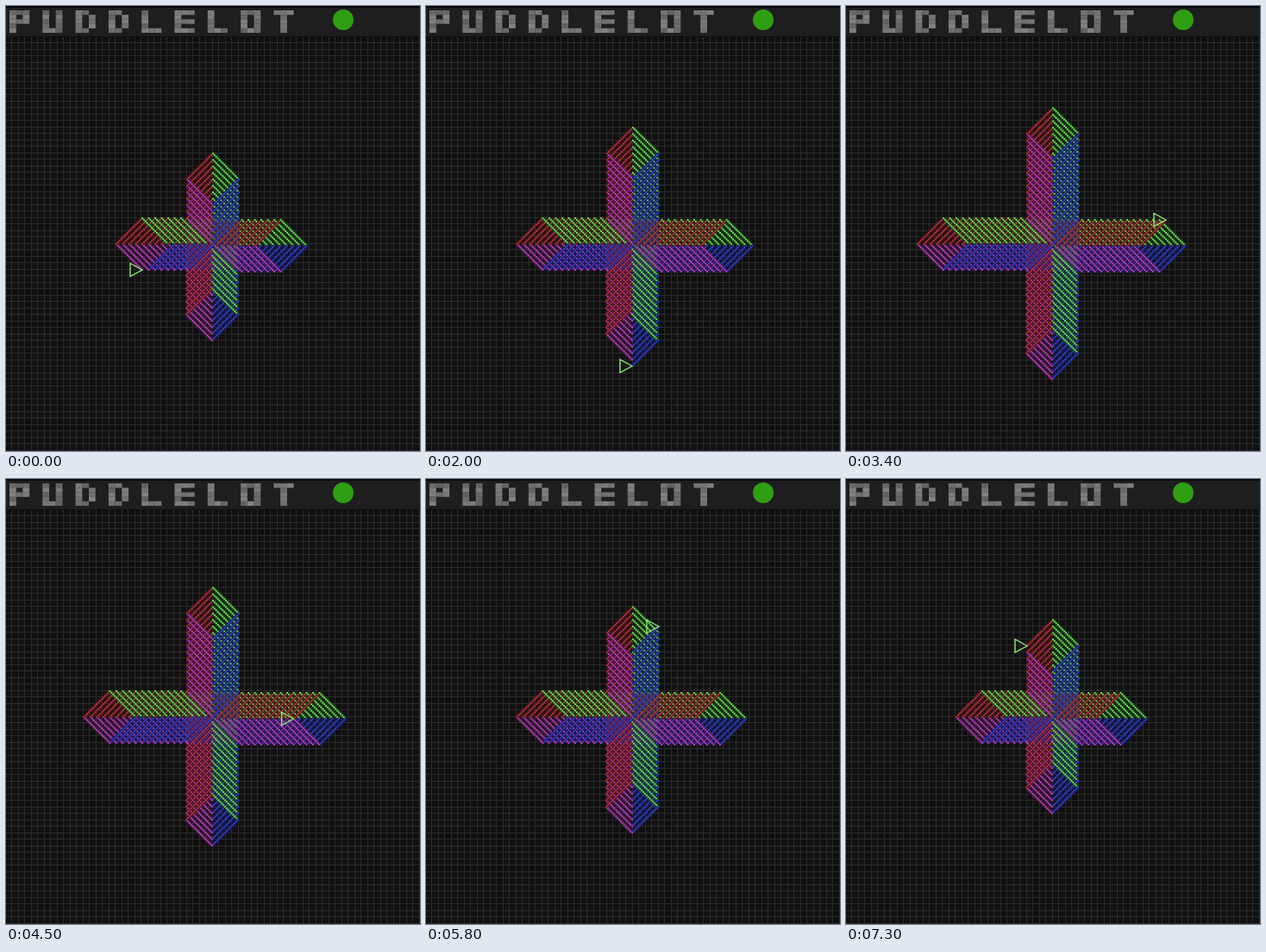
An HTML page with a canvas that plays this animation: 480 by 516 pixels, repeating every 7.4 s.

```html
<!DOCTYPE html>
<html lang="en">
<head>
<meta charset="utf-8">
<title>PUDDLELOT</title>
<style>
html, body { margin: 0; width: 100%; height: 100%; overflow: hidden; background: #101010; }
canvas { display: block; width: 480px; height: 516px; }
</style>
</head>
<body>
<canvas id="stage" width="480" height="516" role="img" aria-label="PUDDLELOT"></canvas>
<script>
const LOOP = 7400, TICK = 100, TURN = 3740;
const CELL = 7.5, DOT = 1.875, RADIUS = 30, TOP = 36;
const ctx = document.getElementById('stage').getContext('2d');

// Diamond corners, clockwise from the right; each side has a bright core and a dim band.
const corners = [[1, 0], [0, 1], [-1, 0], [0, -1]];
const sides = [
  { core: '#3440c8', band: 'rgba(18,30,125,.62)' },
  { core: '#b848b8', band: 'rgba(95,22,100,.62)' },
  { core: '#b83440', band: 'rgba(95,18,24,.62)' },
  { core: '#74e85c', band: 'rgba(20,84,18,.62)' }
];

// Arms in drawing order, growing from the middle; start is the corner facing it.
const arms = [
  { x: 239, y: 275, dx: 0, dy: 1, start: 3 },
  { x: 240.5, y: 276, dx: -1, dy: 0, start: 0 },
  { x: 240, y: 276, dx: 0, dy: -1, start: 1 },
  { x: 243.5, y: 278, dx: 1, dy: 0, start: 2 }
];

// Number of diamonds on the stage over time.
const progress = [
  [0, 45.7], [1000, 53.8], [2000, 60.55], [3400, 71.3], [TURN, 73.8],
  [4500, 67.95], [5800, 58.1], [7300, 46.7], [LOOP, 45.7]
];

const glyphs = { P: '75744', U: '55557', D: '65556', L: '44447', E: '74747', O: '75557', T: '72222' };

function countAt(t) {
  const i = progress.findIndex(([time]) => time > t);
  const [t0, a] = progress[i - 1], [t1, b] = progress[i];
  return a + (b - a) * (t - t0) / (t1 - t0);
}

function diamond(i) {
  const arm = arms[i % 4], shift = Math.floor(i / 4) * CELL;
  return { x: arm.x + arm.dx * shift, y: arm.y + arm.dy * shift, start: arm.start };
}

function corner(d, step) {
  const [cx, cy] = corners[(d.start + step) % 4];
  return [d.x + cx * RADIUS, d.y + cy * RADIUS];
}

function drawSide(d, step) {
  const [x0, y0] = corner(d, step), [x1, y1] = corner(d, step + 1);
  const { core, band } = sides[(d.start + step) % 4];
  ctx.strokeStyle = band;
  ctx.lineWidth = 4;
  ctx.beginPath();
  ctx.moveTo(x0, y0);
  ctx.lineTo(x1, y1);
  ctx.stroke();
  ctx.fillStyle = core;
  for (let k = 0; k < 16; k++) {
    ctx.fillRect(x0 + (x1 - x0) * k / 16 - DOT / 2, y0 + (y1 - y0) * k / 16 - DOT / 2, DOT, DOT);
  }
}

function drawTitle(g, text) {
  let seed = 7;
  [...text].forEach((letter, n) => {
    [...glyphs[letter]].forEach((bits, row) => {
      for (let col = 0; col < 3; col++) {
        seed = (seed * 73 + 41) % 1009;
        const shade = 98 + seed % 34;
        g.fillStyle = `rgb(${shade},${shade},${shade})`;
        if (bits >> (2 - col) & 1) g.fillRect(4 + n * 38.3 + col * 7.7, 5 + row * 5.2, 7.8, 5.3);
      }
    });
  });
}

function makeBackdrop() {
  const layer = document.createElement('canvas');
  layer.width = 480;
  layer.height = 516;
  const g = layer.getContext('2d');
  g.fillStyle = '#101010';
  g.fillRect(0, 0, 480, 516);
  g.fillStyle = '#2b2b2b';
  for (let p = CELL; p <= 480; p += CELL) {
    g.fillRect(Math.floor(p) - 1, TOP, 1, 480);
    g.fillRect(0, Math.floor(TOP + p) - 1, 480, 1);
  }
  g.fillStyle = '#1e1e1e';
  g.fillRect(0, 2, 480, 33);
  g.fillStyle = '#080808';
  g.fillRect(0, 0, 480, 2);
  drawTitle(g, 'PUDDLELOT');
  g.fillStyle = '#2f9e12';
  g.beginPath();
  g.arc(391, 16, 12, 0, Math.PI * 2);
  g.fill();
  return layer;
}

function drawPointer(x, y) {
  ctx.beginPath();
  ctx.moveTo(x, y);
  ctx.lineTo(x - 14, y - 7.5);
  ctx.lineTo(x - 14, y + 7.5);
  ctx.closePath();
  ctx.lineWidth = 1.4;
  ctx.strokeStyle = '#8fe878';
  ctx.stroke();
}

const backdrop = makeBackdrop();

function draw(t) {
  const count = countAt(t), whole = Math.floor(count), part = count - whole;
  const growing = t > 0 && t < TURN;
  const step = Math.floor(4 * (growing ? part : 1 - part));
  const current = diamond(whole);

  ctx.drawImage(backdrop, 0, 0);
  for (let i = 0; i < whole; i++) {
    const d = diamond(i);
    for (let s = 0; s < 4; s++) drawSide(d, s);
  }
  // Shrinking removes the sides in the order they were drawn.
  for (let s = 0; s < 4; s++) {
    if (growing ? s < step : s >= step) drawSide(current, s);
  }
  drawPointer(...corner(current, step));
}

const begin = performance.now();
let shown = -1;
function frame() {
  const elapsed = Math.max(0, performance.now() - begin) % LOOP;
  const t = Math.floor(elapsed / TICK) * TICK;
  if (t !== shown) draw(shown = t);
  requestAnimationFrame(frame);
}
frame();
</script>
</body>
</html>
```
